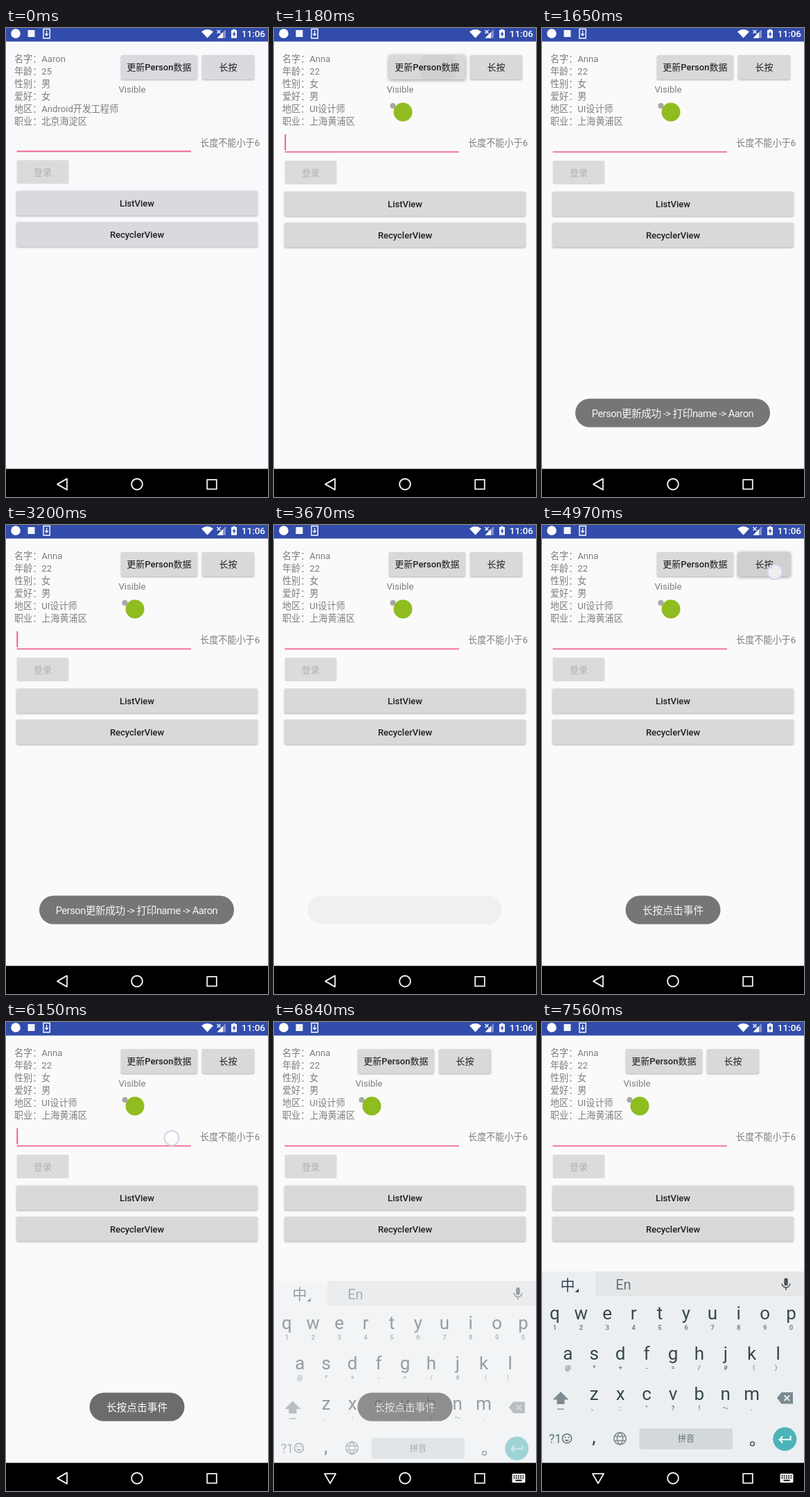
Write an HTML page with a canvas that moves like this. It is 378x675 px and loops after 8000 ms.

```html
<!DOCTYPE html>
<html lang="zh-CN">
<head>
<meta charset="utf-8">
<title>Data binding demo</title>
<style>
  html, body { margin: 0; width: 100%; height: 100%; overflow: hidden; background: #fafafa; }
  canvas { display: block; width: 378px; height: 675px; }
</style>
</head>
<body>
<canvas id="stage"></canvas>
<script>
const W = 378, H = 675, LOOP = 8000;
const STEP = 118.2; // the screen refreshes at this interval, in ms
const FONT = 'Roboto, "Noto Sans CJK SC", "Noto Sans CJK", sans-serif';
const GREY = '#7d7d7d', INK = '#37474f', SLATE = '#5f727b';
const BODY = 13.1, KEY_PITCH = 37.9;
const BLINKS = [1, 5, 9, 14, 18, 23, 27, 31, 35, 39, 43, 48, 52, 56, 60, 64];

const BEFORE = ['名字：Aaron', '年龄：25', '性别：男', '爱好：女', '地区：Android开发工程师', '职业：北京海淀区'];
const AFTER = ['名字：Anna', '年龄：22', '性别：女', '爱好：男', '地区：UI设计师', '职业：上海黄浦区'];

const TOASTS = [
  { text: 'Person更新成功 -> 打印name -> Aaron', x: 48, w: 281, from: 11, out: 27, end: 34, spacing: '-0.5px' },
  { text: '长按点击事件', x: 120.5, w: 137, from: 39, out: 56, end: 60, spacing: '0px' }
];

const KEY_ROWS = [
  { y: 428, keys: 'qwertyuiop', subs: '1234567890' },
  { y: 486, keys: 'asdfghjkl', subs: '@*+-=/#（）' },
  { y: 544, keys: 'zxcvbnm', subs: '、:"?!～.' }
];

const canvas = document.getElementById('stage');
const ctx = canvas.getContext('2d');
const dpr = window.devicePixelRatio || 1;
canvas.width = W * dpr;
canvas.height = H * dpr;

const clamp = v => Math.max(0, Math.min(1, v));
const ease = x => (1 - Math.cos(Math.PI * clamp(x))) / 2;
const within = (k, a, b) => k >= a && k < b;

function text(str, x, y, size, color, align = 'left', weight = 400) {
  ctx.font = `${weight} ${size}px ${FONT}`;
  ctx.textAlign = align;
  ctx.fillStyle = color;
  ctx.fillText(str, x, y);
}

function rect(x, y, w, h, color, r = 0) {
  ctx.fillStyle = color;
  ctx.beginPath();
  ctx.roundRect(x, y, w, h, r);
  ctx.fill();
}

function disc(x, y, r, color) {
  ctx.fillStyle = color;
  ctx.beginPath();
  ctx.arc(x, y, r, 0, 2 * Math.PI);
  ctx.fill();
}

function ring(x, y, r, color, width) {
  ctx.strokeStyle = color;
  ctx.lineWidth = width;
  ctx.beginPath();
  ctx.arc(x, y, r, 0, 2 * Math.PI);
  ctx.stroke();
}

function path(d, color, width = 0) {
  const p = new Path2D(d);
  if (width) {
    ctx.strokeStyle = color;
    ctx.lineWidth = width;
    ctx.stroke(p);
  } else {
    ctx.fillStyle = color;
    ctx.fill(p);
  }
}

function button(label, x, y, w, h, fill, { pressed = false, disabled = false, ripple } = {}) {
  ctx.save();
  if (!disabled) {
    ctx.shadowColor = pressed ? 'rgba(0,0,0,.42)' : 'rgba(0,0,0,.3)';
    ctx.shadowBlur = (pressed ? 5 : 2.5) * dpr;
    ctx.shadowOffsetY = dpr;
  }
  rect(x, y, w, h, fill, 2);
  ctx.restore();
  if (ripple) {
    ctx.save();
    ctx.beginPath();
    ctx.rect(x, y, w, h);
    ctx.clip();
    disc(...ripple, 'rgba(0,0,0,.045)');
    ctx.restore();
  }
  text(label, x + w / 2, y + h / 2 + 4.8, 13, disabled ? '#b0b0b0' : '#1f1f1f', 'center', 500);
}

function touch(x, y, fill) {
  disc(x, y, 10.5, fill);
  ring(x, y, 10.5, '#d3d5e8', 2);
}

function statusBar() {
  rect(0, 0, W, 19.6, '#324cab');
  disc(14, 8, 6.8, '#fff');
  rect(31.5, 3, 10, 10, '#f2f4fb');
  path('M54 1.5H63.3V14.7H54Z', '#fff', 1.4);
  path('M58.6 4V10.5M56.3 8.2L58.6 10.8L61 8.2', '#fff', 1.3);
  path('M282 5.2Q290.5 -1.4 299 5.2L290.5 14.4Z', '#fff');
  path('M304.5 14.5L317 2V14.5Z', 'rgba(255,255,255,.4)');
  path('M304.5 14.5L313 6V14.5Z', '#fff');
  path('M304.5 3L309.5 8M309.5 3L304.5 8', '#fff', 1.3);
  path('M325 3H327.2V1.8H330.8V3H333V14.6H325Z', '#fff');
  path('M329.8 4.5L326.6 9.4H328.6V13L331.6 8H329.8Z', '#324cab');
  text('11:06', 374, 13.4, 13.5, '#fff', 'right', 500);
}

function navBar(typing) {
  rect(0, 634.5, W, 41, '#000');
  ctx.lineJoin = 'round';
  path(typing ? 'M73 650.2H89L81 664Z' : 'M88 648.6V664.6L74 656.6Z', '#f4f4f4', 1.8);
  ctx.lineJoin = 'miter';
  ring(189, 656.6, 7.9, '#f4f4f4', 1.9);
  path('M290.2 650.2H303.8V663.6H290.2Z', '#f4f4f4', 1.8);
  if (!typing) return;
  rect(343.5, 650, 19, 13, '#f4f4f4', 1.5);
  for (let row = 0; row < 2; row++)
    for (let i = 0; i < 5; i++) rect(345.6 + i * 3.2, 652.4 + row * 3, 1.8, 1.8, '#000');
  rect(348.5, 658.8, 9, 1.8, '#000');
}

function header(k, fill) {
  const updated = k >= 10;
  const dx = k >= 57 ? -45 : 0;
  const tap = within(k, 9, 13);
  const hold = within(k, 35, 47);
  (updated ? AFTER : BEFORE).forEach((line, i) => text(line, 12, 48.6 + i * 18, BODY, GREY));
  button('更新Person数据', 166 + dx, 39, 109.8, 35, fill,
    { pressed: tap, ripple: tap && [237, 57, 28 + (k - 10) * 12] });
  button('长按', 283 + dx, 39, 75, 35, hold ? '#d0d0d0' : fill, { pressed: hold });
  text('Visible', 162.5 + dx, 93.3, BODY, GREY);
  if (updated) {
    disc(186 + dx, 121, 13.5, '#8fbc1f');
    disc(171.5 + dx, 112, 4, '#a6a6a6');
  }
}

function form(k, fill) {
  rect(15.5, 177.4, 251.5, 1.8, '#f2648e');
  if (BLINKS.filter(b => b <= k).length % 2) rect(15.4, 153, 1.8, 23, '#f2507f');
  text('长度不能小于6', 366, 170.4, BODY, GREY, 'right');
  button('登录', 15.5, 191, 75, 34, '#dbdbdc', { disabled: true });
  button('ListView', 15, 235.4, 348, 35.4, fill);
  button('RecyclerView', 15, 280.2, 348, 35.4, fill);
}

function screen(k) {
  const settled = k >= 8;
  const fill = settled ? '#d9d9d9' : '#d9d9de';
  rect(0, 0, W, H, settled ? '#fafafa' : '#f9f9fc');
  header(k, fill);
  ctx.save();
  if (!settled) ctx.translate(0, -0.8);
  form(k, fill);
  ctx.restore();

  if (within(k, 8, 10)) touch(237, 62, 'rgba(255,255,255,.6)');
  if (within(k, 34, 46)) touch(336, 67.5, 'rgba(255,255,255,.65)');
  if (within(k, 52, 54)) touch(239, 167, 'rgba(255,255,255,.4)');
}

function keyboard(k) {
  if (k < 56) return;
  const shown = ease((k - 55) / 4);
  ctx.save();
  ctx.globalAlpha = shown;
  ctx.translate(0, 27 * (1 - shown));
  rect(0, 359, W, 276, '#ebeff1');
  rect(77, 359, W - 77, 36, '#e5e6e7');
  text('中', 37, 385.5, 21, INK, 'center');
  path('M53 383.5V389H47.5Z', INK);
  text('En', 117.4, 385, 20, SLATE, 'center');
  rect(349.3, 368.5, 5.4, 11, '#4a5052', 2.7);
  path('M346.3 376.5A5.7 5.7 0 0 0 357.7 376.5M352 382V386', '#4a5052', 1.5);

  for (const { y, keys, subs } of KEY_ROWS) {
    [...keys].forEach((key, i) => {
      const x = W / 2 + (i - (keys.length - 1) / 2) * KEY_PITCH;
      text(key, x, y, 26, INK, 'center');
      text(subs[i], x, y + 15.2, 9.5, SLATE, 'center', 500);
    });
  }

  path('M27 532L38.5 543.5H32.5V550H21.5V543.5H15.5Z', '#7c8a91');
  rect(22, 556.5, 10, 1.3, '#7c8a91');
  path('M339 541L345.5 533H362V549.5H345.5Z', '#7c8a91');
  path('M349.5 537.5L357 545M357 537.5L349.5 545', '#ebeff1', 1.8);

  text('?1', 10, 606, 17.5, SLATE);
  ring(36, 599.5, 6.6, SLATE, 1.5);
  disc(33.6, 597.6, 1.1, SLATE);
  disc(38.4, 597.6, 1.1, SLATE);
  path('M32.5 601.2A3.8 3.8 0 0 0 39.5 601.2Z', SLATE);
  text(',', 75, 606, 24, INK, 'center', 500);
  ring(112.5, 599.5, 8.7, '#7c8a91', 1.6);
  path('M104.5 596.5H120.5M104.5 602.5H120.5M112.5 590.8C107 596 107 603 112.5 608.2C118 603 118 596 112.5 590.8', '#7c8a91', 1.4);
  rect(140.5, 585, 134.5, 30, '#d3d8db', 3);
  text('拼音', 208, 604.4, 12, SLATE, 'center');
  ring(303.5, 607, 2.9, INK, 1.4);
  disc(350.3, 600.3, 17, '#4cb4b8');
  path('M358.5 595.5V601H343M347.3 596.3L342.6 601L347.3 605.7', '#fff', 2);
  ctx.restore();
}

function toast({ text: label, x, w, from, out, end, spacing }, k) {
  if (!within(k, from, end)) return;
  ctx.save();
  ctx.globalAlpha = k < out
    ? ease(0.28 + 0.183 * (k - from))
    : 1 - ease(0.17 + 0.165 * Math.min(k - out, 4));
  rect(x, 533.5, w, 41, '#6c6c6c', 20.5);
  ctx.letterSpacing = spacing;
  text(label, x + w / 2, 559.6, 14.7, '#fff', 'center');
  ctx.restore();
}

function draw(t) {
  const k = Math.floor((t + 14) / STEP);
  ctx.setTransform(dpr, 0, 0, dpr, 0, 0);
  screen(k);
  statusBar();
  keyboard(k);
  navBar(k >= 54);
  TOASTS.forEach(item => toast(item, k));
}

const start = performance.now();
function tick() {
  draw((performance.now() - start) % LOOP);
  requestAnimationFrame(tick);
}
tick();
</script>
</body>
</html>
```
